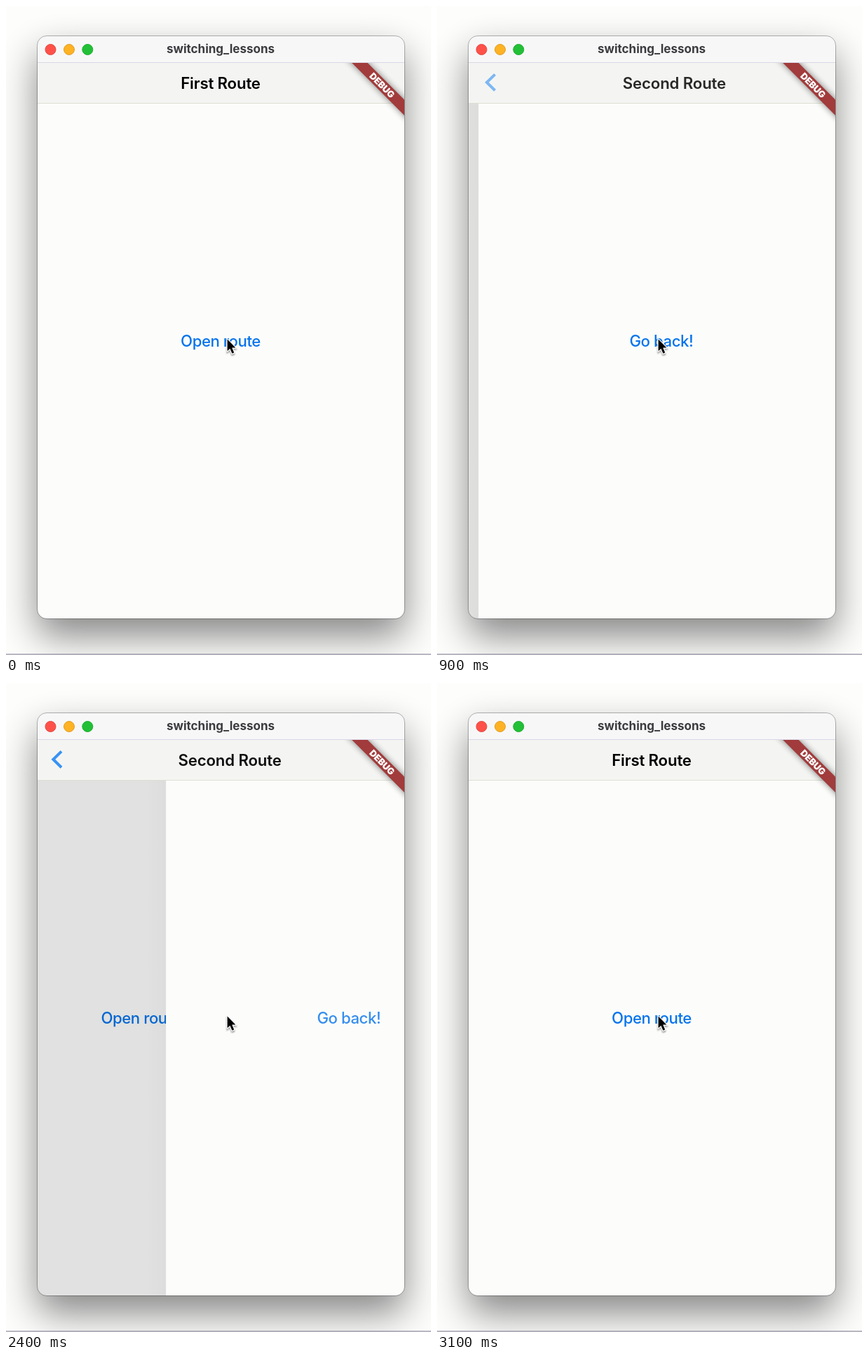
An HTML page that plays this animation: 606x924 px, repeating every 3200 ms.

```html
<!DOCTYPE html>
<html lang="en">
<head>
<meta charset="utf-8">
<title>Route transition</title>
<style>
  html, body { margin: 0; width: 100%; height: 100%; overflow: hidden; background: #fdfdfc; }
  svg { display: block; }
  text { font-family: Inter, Roboto, sans-serif; text-anchor: middle; }
  .title { font-size: 22.2px; font-weight: 600; letter-spacing: -.15px; }
  .link { font-size: 22.2px; font-weight: 450; letter-spacing: -.45px; fill: #0673ec; }
  .caption { font-size: 17px; font-weight: 700; fill: #3c3b3f; }
  .ribbon { font-size: 13px; font-weight: 900; fill: #fff; letter-spacing: -.2px; }
</style>
</head>
<body>
<svg width="606" height="924" viewBox="0 0 606 924">
  <defs>
    <clipPath id="frame"><rect x="45" y="43" width="523" height="829" rx="13"/></clipPath>
    <clipPath id="content"><rect x="45" y="81" width="523" height="792"/></clipPath>
    <filter id="windowBlur" x="-30%" y="-30%" width="160%" height="160%"><feGaussianBlur stdDeviation="27"/></filter>
    <filter id="softBlur" x="-30%" y="-150%" width="160%" height="400%"><feGaussianBlur stdDeviation="5"/></filter>
    <filter id="cursorBlur" x="-50%" y="-50%" width="200%" height="200%"><feGaussianBlur stdDeviation="1.3"/></filter>
    <linearGradient id="edge"><stop offset="0" stop-opacity="0"/><stop offset="1" stop-opacity=".03"/></linearGradient>
    <path id="arrow" d="M315.6 474.6V491.2L319.4 487.7L322.4 494.8L325.2 493.6L322.2 486.6H327.4Z"/>
  </defs>

  <rect x="45" y="67" width="523" height="830" rx="13" opacity=".47" filter="url(#windowBlur)"/>
  <rect y="922.5" width="606" height="1" fill="#77748a"/>

  <g clip-path="url(#frame)">
    <rect x="45" y="43" width="523" height="830" fill="#fcfdfb"/>
    <text id="openLink" class="link" y="485">Open route</text>
    <rect id="barrier" x="45" y="81" width="523" height="792"/>
    <g id="secondPage">
      <rect id="edgeShadow" x="15" y="81" width="30" height="792" fill="url(#edge)"/>
      <rect x="45" y="81" width="523" height="792" fill="#fcfdfb"/>
      <text id="backLink" class="link" x="305.7" y="485">Go back!</text>
    </g>

    <rect x="45" y="81" width="523" height="57" fill="#f4f5f2"/>
    <rect x="45" y="138" width="523" height="1" fill="#dddfd3"/>
    <text id="firstTitle" class="title" y="117.5">First Route</text>
    <text id="secondTitle" class="title" y="117.5">Second Route</text>
    <path id="chevron" d="M76.6 97.4L64.9 108.8L76.6 120.2" fill="none" stroke="#0a7af5" stroke-width="4"/>

    <g clip-path="url(#content)">
      <g transform="translate(536.2 112.8) rotate(45)">
        <rect x="-75" y="-7.9" width="150" height="15.8" opacity=".5" filter="url(#softBlur)"/>
        <rect x="-75" y="-7.9" width="150" height="15.8" fill="#a23b3b"/>
        <text class="ribbon" y="4.7">DEBUG</text>
      </g>
    </g>

    <rect x="45" y="43" width="523" height="37" fill="#f7f7f8"/>
    <rect x="45" y="80" width="523" height="1" fill="#dad8e6"/>
    <circle cx="63.5" cy="62" r="7.5" fill="#ff5149" stroke="#e2473f"/>
    <circle cx="90" cy="62" r="7.5" fill="#ffb224" stroke="#e09e22"/>
    <circle cx="116.3" cy="62" r="7.5" fill="#22c036" stroke="#1fab30"/>
    <text class="caption" x="306" y="67.3">switching_lessons</text>
  </g>
  <rect x="44.5" y="42.5" width="524" height="830" rx="13.5" fill="none" stroke="#000" stroke-opacity=".28"/>

  <use href="#arrow" y="2" opacity=".45" stroke="#000" stroke-width="2" filter="url(#cursorBlur)"/>
  <use href="#arrow" fill="#000" stroke="#fff" stroke-width="2.6" paint-order="stroke" stroke-linejoin="round"/>
</svg>

<script>
const LOOP = 3200, STEP = 100, DURATION = 500;
const PUSH_START = 600, POP_START = 2333.3;
const OPEN_PRESS = 543, BACK_PRESS = 2224;
const WIDTH = 523, CENTER = 306;

const $ = id => document.getElementById(id);
const clamp = v => Math.min(1, Math.max(0, v));
const mix = (a, b, u) => a + (b - a) * u;

// Cubic segment y(x) through four points, solved by bisection.
function segment(x0, y0, x1, y1, x2, y2, x3, y3) {
  const at = (a, b, c, d, u) =>
    a * (1 - u) ** 3 + 3 * b * u * (1 - u) ** 2 + 3 * c * u * u * (1 - u) + d * u ** 3;
  return x => {
    let lo = 0, hi = 1;
    for (let i = 0; i < 24; i++) {
      const mid = (lo + hi) / 2;
      if (at(x0, x1, x2, x3, mid) < x) lo = mid; else hi = mid;
    }
    return at(y0, y1, y2, y3, lo);
  };
}
const bezier = (x1, y1, x2, y2) => {
  const curve = segment(0, 0, x1, y1, x2, y2, 1, 1);
  return x => x <= 0 ? 0 : x >= 1 ? 1 : curve(x);
};

const rise = segment(0, 0, .056, .024, .108, .3085, .198, .541);
const settle = segment(.198, .541, .3655, 1, .5465, .989, 1, 1);
const slideCurve = x => x <= 0 ? 0 : x >= 1 ? 1 : x < .198 ? rise(x) : settle(x);
const parallaxCurve = bezier(.35, .91, .33, .97);
const barCurve = bezier(.4, 0, .2, 1);
const ease = bezier(.25, .1, .25, 1);

function pressOpacity(elapsed) {
  if (elapsed < 0) return 1;
  if (elapsed < 120) return 1 - .6 * slideCurve(elapsed / 120);
  return 1 - .6 * (1 - clamp((elapsed - 120) / 180)) ** 3;
}

function place(id, x, opacity) {
  $(id).setAttribute("x", x);
  $(id).setAttribute("opacity", clamp(opacity));
}

function draw(time) {
  const push = clamp((time - PUSH_START) / DURATION);
  const pop = clamp((time - POP_START) / DURATION);
  const progress = curve => curve(push) - curve(pop);

  const slide = progress(slideCurve);
  const parallax = progress(parallaxCurve);
  const bar = progress(barCurve);
  const dim = ease(time < POP_START ? push : 1 - pop);

  place("openLink", CENTER - parallax * WIDTH / 3, pressOpacity(time - OPEN_PRESS));
  $("backLink").setAttribute("opacity", pressOpacity(time - BACK_PRESS));
  $("barrier").setAttribute("opacity", .11 * dim);
  $("secondPage").setAttribute("transform", `translate(${(1 - slide) * WIDTH})`);
  $("edgeShadow").setAttribute("opacity", clamp(parallax));

  place("firstTitle", CENTER - 164 * bar, 1 - bar / .4);
  $("firstTitle").setAttribute("fill", `rgb(0 ${mix(0, 122, bar)} ${mix(0, 255, bar)})`);
  place("secondTitle", CENTER + (1 - bar) * WIDTH / 2, (bar - .25) / .75);
  $("chevron").setAttribute("transform", `translate(${(1 - bar) * 49})`);
  $("chevron").setAttribute("opacity", clamp((bar - .75) / .25));
}

const start = performance.now();
function tick() {
  const time = (performance.now() - start) % LOOP;
  draw(Math.floor(time / STEP) * STEP);
  requestAnimationFrame(tick);
}
tick();
</script>
</body>
</html>
```
